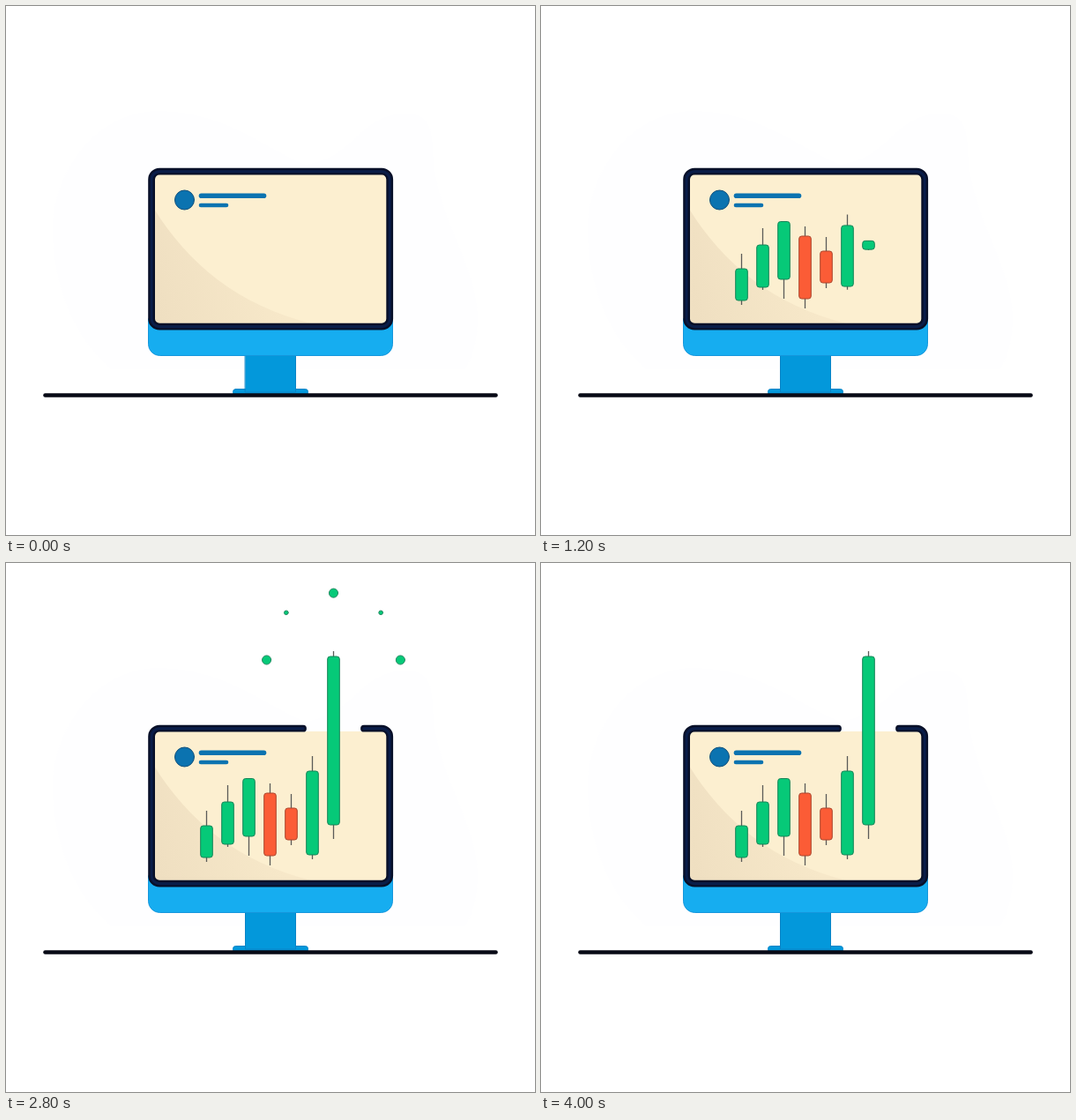
An HTML page with a canvas for the animation above (4100 ms loop, 600 by 600 pixels).

```html
<!DOCTYPE html>
<html lang="en">
<head>
<meta charset="utf-8">
<title>Rising candlestick chart</title>
<style>
  html, body { margin: 0; width: 100%; height: 100%; overflow: hidden; background: #fff; }
  canvas { display: block; }
</style>
</head>
<body>
<canvas id="stage" width="600" height="600"></canvas>
<script>
const ctx = document.getElementById('stage').getContext('2d');
const LOOP = 4100, STEP = 100;
const BLUE = '#0b73b0', STAND = '#0398db', STAND_EDGE = '#0a84c6';
const GREEN = '#06c978', RED = '#fb5c36';
const PEAK_X = 371.5;

// Price where each candle opens and closes, as stage heights: a falling price is red.
const trades = [[334, 298], [319, 271], [310, 244.5], [261, 332], [278, 314], [331, 236], [297, 106]];
const upperWicks = [17, 19, 0, 11, 16, 17, 6];
const WICK_SUM = 22;

const progress = (t, start, duration) => Math.max(0, Math.min(1, (t - start) / duration));

function outline(width, color) {
  ctx.lineWidth = width;
  ctx.strokeStyle = color;
  ctx.stroke();
}

function box(x, y, w, h, radius, fill, edge) {
  ctx.beginPath();
  ctx.roundRect(x, y, w, h, radius);
  ctx.fillStyle = fill;
  ctx.fill();
  if (edge) outline(1, edge);
}

function line(x1, y1, x2, y2, width, color, cap = 'round') {
  ctx.beginPath();
  ctx.moveTo(x1, y1);
  ctx.lineTo(x2, y2);
  ctx.lineCap = cap;
  outline(width, color);
}

function dot(x, y, r, fill, edge) {
  ctx.beginPath();
  ctx.arc(x, y, r, 0, Math.PI * 2);
  ctx.fillStyle = fill;
  ctx.fill();
  outline(1, edge);
}

function backdrop() {
  ctx.fillStyle = '#fff';
  ctx.fillRect(0, 0, 600, 600);
  ctx.fillStyle = '#fefeff';
  ctx.fill(new Path2D('M120 412C75 375 52 310 53 250C55 190 100 120 172 119C250 120 290 160 340 180C400 170 400 122 455 122C490 122 482 160 486 185C495 250 535 300 535 355C534 385 528 400 520 412Z'));
}

// The top edge opens around the tallest candle.
function frame(gap) {
  const left = 165.1, right = 435.2, top = 187.7, bottom = 363.7;
  ctx.beginPath();
  ctx.moveTo(PEAK_X + gap, top);
  ctx.arcTo(right, top, right, bottom, 9);
  ctx.arcTo(right, bottom, left, bottom, 9);
  ctx.arcTo(left, bottom, left, top, 9);
  ctx.arcTo(left, top, right, top, 9);
  ctx.lineTo(PEAK_X - gap, top);
  ctx.lineCap = 'round';
  outline(7.8, '#081029');
  outline(3, '#0a1d49');
}

function monitor(gap) {
  box(257.5, 434.5, 85, 7, 3, STAND, STAND_EDGE);
  box(271.5, 390, 57, 48, 0, STAND, STAND_EDGE);
  line(44.5, 441.5, 555.5, 441.5, 4.6, '#080a16');
  box(161.5, 355, 277, 41.5, [0, 0, 13, 13], '#16adf0', '#1596dc');

  box(168, 191, 266, 171, 4, '#fcefd0');
  const shade = ctx.createLinearGradient(169, 340, 300, 300);
  shade.addColorStop(0, '#efdfc1');
  shade.addColorStop(1, '#f7e8c9');
  ctx.fillStyle = shade;
  ctx.fill(new Path2D('M168 230C205 290 262 340 350 361H168Z'));
  frame(gap);

  dot(202.5, 220, 11, BLUE, '#14507a');
  line(221.5, 215.3, 292.5, 215.3, 5.6, BLUE);
  line(221, 226, 250, 226, 4.6, BLUE);
}

// Each candle grows from its middle, the tallest one from lower down and for longer.
function candle(t, [open, close], i) {
  const top = Math.min(open, close), bottom = Math.max(open, close);
  const p = progress(t, 118 * i + 12.5 * i * i, Math.max(400, 4.3 * (bottom - top)));
  if (!p) return;
  const x = 227.5 + 24 * i, rising = close < open;
  const origin = Math.max(275, (top + bottom) / 2);
  const at = y => origin + (y - origin) * p;
  const wick = upperWicks[i];
  line(x, at(top - wick), x, at(bottom + WICK_SUM - wick), 1.3, '#5b5b58', 'butt');
  box(x - 6.8, at(top), 13.6, at(bottom) - at(top), 3, rising ? GREEN : RED, rising ? '#168357' : '#a9472f');
}

function burst(t) {
  const p = progress(t, 2000, 1000);
  const distance = 76.5 * (1 - (1 - p) ** 3);
  const size = Math.min(1, p / 0.2, (1 - p) / 0.3);
  if (!size) return;
  for (let i = 0; i < 5; i++) {
    const angle = Math.PI * (1 + i / 4);
    dot(PEAK_X + distance * Math.cos(angle), 110 + distance * Math.sin(angle),
        (i % 2 ? 3.5 : 7.6) * size, GREEN, '#278a63');
  }
}

function draw() {
  const t = Math.floor(performance.now() % LOOP / STEP) * STEP;
  backdrop();
  monitor(34.5 * progress(t, 1400, 200));
  burst(t);
  trades.forEach((trade, i) => candle(t, trade, i));
  requestAnimationFrame(draw);
}

draw();
</script>
</body>
</html>
```
